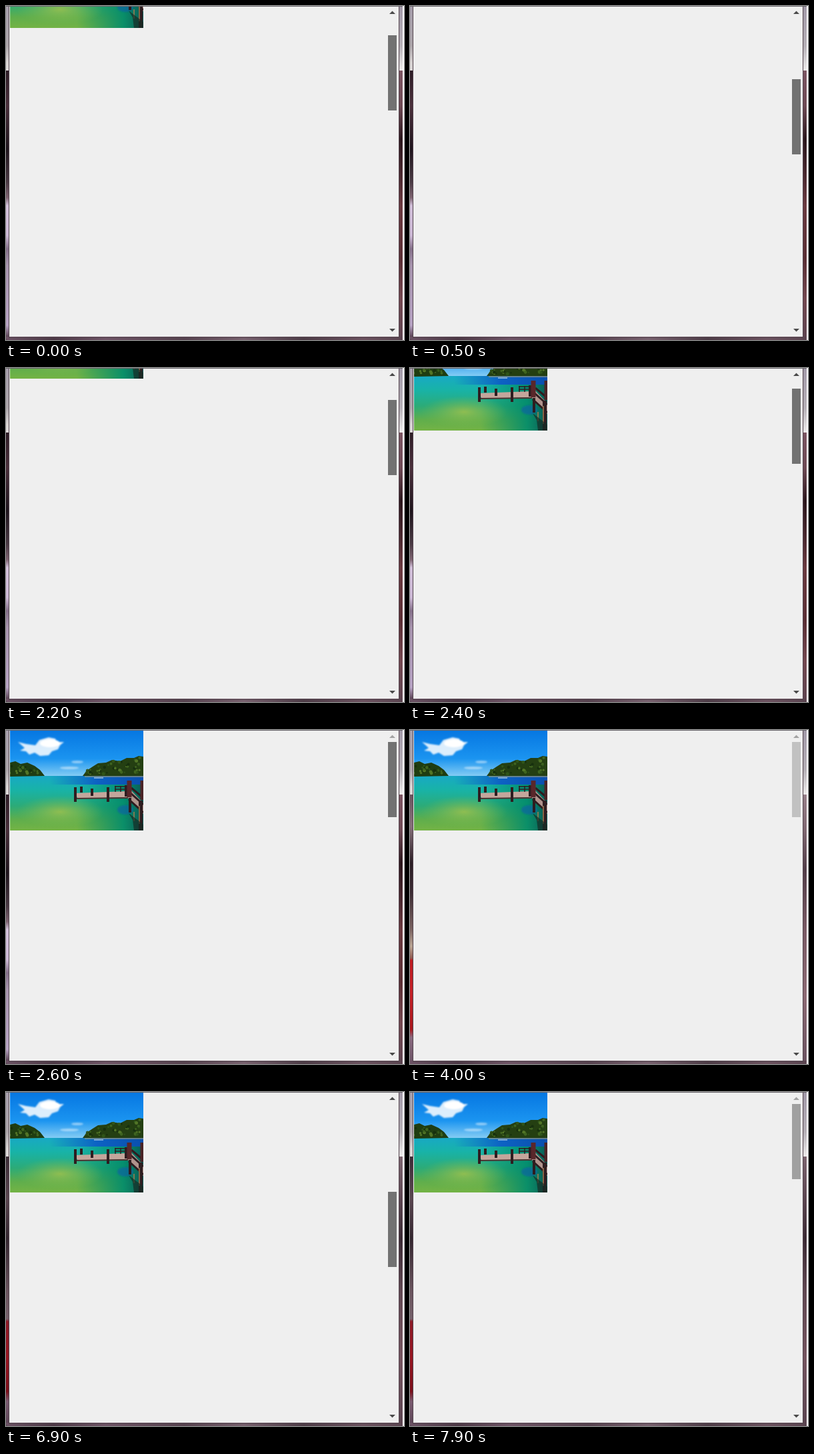
Recreate the animation shown at these times as an HTML page. Size 597x502 px, loop 8 s.

```html
<!DOCTYPE html>
<html lang="en">
<head>
<meta charset="utf-8">
<title>Scrolling window</title>
<style>
html, body { margin: 0; width: 100%; height: 100%; overflow: hidden; background: #fff; }
#stage { position: relative; width: 597px; height: 502px; overflow: hidden; }
#stage div, #stage svg { position: absolute; }
.left { left: 0; top: 0; width: 5px; height: 502px; }
.right { left: 589px; top: 0; width: 6px; height: 502px; }
.base { left: 0; top: 497px; width: 595px; height: 5px; border-radius: 0 0 4px 4px;
  background: linear-gradient(90deg, #6c5265, #4b3644 12%, #705467 25%, #56414e 45%, #7a6270 60%, #4c3a45 75%, #6d5260 90%, #5b4450); }
.corner { left: 0; top: 499px; width: 595px; height: 3px; }
.window { left: 5px; top: 1px; width: 584px; height: 496px; background: #efefef; overflow: hidden; }
.frame { left: 4px; top: 0; width: 584px; height: 497px; border: 1px solid #55464f; border-top-color: #66656a; }
.topline { left: 0; top: 0; width: 595px; height: 1px; background: #69666b; }
#photo { left: 1px; top: 0; }
#thumb { left: 568px; top: 0; width: 13px; height: 113px; }
#bars { left: 0; top: 0; }
</style>
</head>
<body>
<div id="stage">
  <div class="left" id="left"></div>
  <div class="right" id="right"></div>
  <div class="base"></div>
  <div class="frame"></div>
  <div class="topline"></div>
  <div class="window">
    <svg id="photo" width="200" height="150" viewBox="0 0 200 150">
      <defs>
        <linearGradient id="sky" x1="0" y1="0" x2="0" y2="1">
          <stop offset="0" stop-color="#0677e2"/>
          <stop offset=".6" stop-color="#1b94f0"/>
          <stop offset="1" stop-color="#8bd0f4"/>
        </linearGradient>
        <linearGradient id="sea" x1="0" y1="0" x2="0" y2="1">
          <stop offset="0" stop-color="#18a9c4"/>
          <stop offset=".25" stop-color="#18b3a8"/>
          <stop offset=".55" stop-color="#2cab78"/>
          <stop offset=".8" stop-color="#5fae4c"/>
          <stop offset="1" stop-color="#74b345"/>
        </linearGradient>
        <linearGradient id="deep" x1="0" y1="0" x2="1" y2="0">
          <stop offset=".3" stop-color="#0b64cc" stop-opacity="0"/>
          <stop offset=".65" stop-color="#0d62c4"/>
          <stop offset="1" stop-color="#0a4fae"/>
        </linearGradient>
        <linearGradient id="shade" x1="0" y1="0" x2="1" y2="0">
          <stop offset=".5" stop-color="#008c68" stop-opacity="0"/>
          <stop offset=".85" stop-color="#008b6c" stop-opacity=".9"/>
          <stop offset="1" stop-color="#0a5a55"/>
        </linearGradient>
        <radialGradient id="shoal">
          <stop offset="0" stop-color="#9cc04e" stop-opacity=".85"/>
          <stop offset="1" stop-color="#7cb850" stop-opacity="0"/>
        </radialGradient>
        <filter id="soft"><feGaussianBlur stdDeviation="1"/></filter>
      </defs>
      <rect width="200" height="70" fill="url(#sky)"/>
      <g fill="#fff" filter="url(#soft)">
        <path d="M12 17l12 3 14 2 6-8 14-4 10 2 2 5 11 0-6 5-3 6-9 3-5 6-13 1-8-5-8 3-5-5-9-1 7-4z" opacity=".85"/>
        <ellipse cx="60" cy="19" rx="15" ry="6"/>
        <ellipse cx="101" cy="47" rx="9" ry="2" opacity=".45"/>
        <ellipse cx="89" cy="56" rx="14" ry="2" opacity=".45"/>
      </g>
      <rect y="68" width="200" height="82" fill="url(#sea)"/>
      <rect y="68" width="200" height="13" fill="url(#deep)"/>
      <rect y="81" width="200" height="69" fill="url(#shade)"/>
      <ellipse cx="75" cy="122" rx="65" ry="24" fill="url(#shoal)"/>
      <ellipse cx="173" cy="119" rx="12" ry="7" fill="#0b62a4" opacity=".65" filter="url(#soft)"/>
      <g id="trees">
        <path d="M0 69V48l8-2 8 4 10-2 11 5 8 6 7 9z" fill="#1f3d12"/>
        <path d="M109 68l6-8 9-6 8-5 12-1 9-4 12 2 10-5 11 0 7-3 7 1v29z" fill="#243f12"/>
      </g>
      <path d="M112 69h88" stroke="#b9a86a"/>
      <path d="M126 71h14" stroke="#e6f2f4"/>
      <path d="M97 94l77-3 3 9-75 2z" fill="#c4a69c"/>
      <path d="M97 101l80-1v2l-78 1z" fill="#4c3432"/>
      <path d="M172 90l9-1 19 20v16l-22-22z" fill="#b0938c"/>
      <g fill="none" stroke="#2e1d20">
        <path d="M157 84h18M157 88h18M158 83v9M166 83v9M174 83v9" stroke-width="1.5"/>
        <path d="M98 85v22M107 84v9M123 87v11M147 85v22" stroke-width="4"/>
        <path d="M180 101v22M174 82v17" stroke-width="4"/>
        <path d="M182 86l18 15M181 94l19 17M178 103l22 20" stroke-width="3"/>
        <path d="M196 105v45" stroke-width="6"/>
      </g>
      <path d="M179 75v25" stroke="#59272a" stroke-width="7"/>
      <path d="M198 75v29" stroke="#4a2427" stroke-width="5"/>
      <path d="M194 113v27M186 122v14" stroke="#a77b50" stroke-width="1.5"/>
      <path d="M178 124l6 10 2 16h14v-9z" fill="#152c25" opacity=".7"/>
    </svg>
    <div id="thumb"></div>
    <svg id="bars" width="584" height="496">
      <path id="up" d="M570 11l4.5-4.5 4.5 4.5z"/>
      <path d="M570 484h9l-4.500 4.500z" fill="#4a4a4a"/>
    </svg>
  </div>
</div>
<script>
const $ = id => document.getElementById(id);
const LOOP = 8000, TOP = 18, RATIO = 4.5;

// [ms, thumb top]
const drag = [
  [0, 44.2], [900, 163], [1000, 170], [1100, 174], [1200, 174],
  [1300, 167], [2100, 55], [2200, 48], [2500, 22], [2600, TOP],
  [5200, TOP], [5300, 24], [5600, 54], [5700, 68], [6000, 111],
  [6500, 177], [6700, 177], [6800, 170], [7500, 28], [7600, TOP], [LOOP, TOP]
];

const PRESSED = '#727272', HOVER = '#a0a0a0', IDLE = '#c1c1c1';
const tints = [[0, PRESSED], [3000, HOVER], [3200, IDLE], [4900, HOVER], [5200, PRESSED], [7900, HOVER]];

// Blurred desktop at both sides of the window: upper band, then the rest
const fade = (top, rest) => `linear-gradient(${top}, ${rest})`;
const leftTop = '#a69eac, #aca5aa 60px, #d8d3d3 85px, #dcd8d8 97px';
const rightTop = '#a299a8, #b5afb6 60px, #eceaea 97px';
const views = [
  [0,
    fade(leftTop, '#2d1c26 97px, #4a2f3b 150px, #1e141c 215px, #4a3a44 265px, #7d6270 288px, #d2c0da 300px, #cdb9d6 345px, #85708a 365px, #a794ae 390px, #b7a3c4 480px, #5b4355 497px'),
    fade(rightTop, '#7c5562 97px, #6f4a55 150px, #2b161c 200px, #4d2a31 260px, #6b3a40 300px, #5a2e34 380px, #744850 440px, #5d4450')],
  [4000,
    fade(leftTop, '#6a545e 97px, #86707a 145px, #2a1c24 200px, #3c2c34 245px, #7a6260 300px, #bba695 325px, #8f5a50 343px, #bd1b21 346px, #c32127 395px, #a8161c 450px, #8a6a80 462px, #6a5264'),
    fade(rightTop, '#98808a 97px, #806872 150px, #523d48 210px, #7a5a65 300px, #8d6a74 400px, #6a5260')],
  [5200,
    fade(leftTop, '#3b2c36 97px, #5a4650 160px, #33262f 220px, #6a545e 300px, #75606a 341px, #8c1a26 345px, #961521 400px, #7a0f1a 450px, #7a5a70 465px, #5a4455'),
    fade(rightTop, '#7d6570 97px, #5c4651 160px, #3a2933 220px, #614852 300px, #75545f 400px, #5a4450')]
];

const current = (list, t) => list.filter(item => item[0] <= t).pop();

function thumbAt(t) {
  const i = Math.max(1, drag.findIndex(k => k[0] >= t));
  const [t0, a] = drag[i - 1], [t1, b] = drag[i];
  return a + (b - a) * (t - t0) / (t1 - t0);
}

// Round crowns along both shores
function plantTrees() {
  let seed = 7;
  const rnd = () => (seed = seed * 16807 % 2147483647) / 2147483647;
  const shades = ['#3f6420', '#527527', '#17300e', '#30551a'];
  let svg = '';
  for (let i = 0; i < 70; i++) {
    const near = i < 22;
    const u = rnd();
    const x = near ? u * 45 : 114 + u * 84;
    const ridge = near ? 49 + u * u * 14 : 60 - Math.sqrt(u) * 20;
    const y = ridge + rnd() * (65 - ridge);
    svg += `<circle cx="${x.toFixed(1)}" cy="${y.toFixed(1)}" r="${(1 + rnd() * 1.5).toFixed(1)}" fill="${shades[i % 4]}"/>`;
  }
  $('trees').insertAdjacentHTML('beforeend', svg);
}

let view;
function draw(now) {
  const t = Math.floor((now % LOOP) / 100) * 100;
  const y = thumbAt(t);
  const scroll = t < 4000 ? Math.round((y - TOP) * RATIO) : 0;
  $('photo').style.transform = `translateY(${-scroll}px)`;
  $('thumb').style.transform = `translateY(${Math.round(y) - 1}px)`;
  $('thumb').style.background = current(tints, t)[1];
  $('up').setAttribute('fill', y > TOP ? '#4a4a4a' : '#a3a3a3');
  const next = current(views, t);
  if (next !== view) {
    view = next;
    $('left').style.background = view[1];
    $('right').style.background = view[2];
  }
}

plantTrees();
const start = performance.now();
function tick() {
  draw(performance.now() - start);
  requestAnimationFrame(tick);
}
tick();
</script>
</body>
</html>
```
